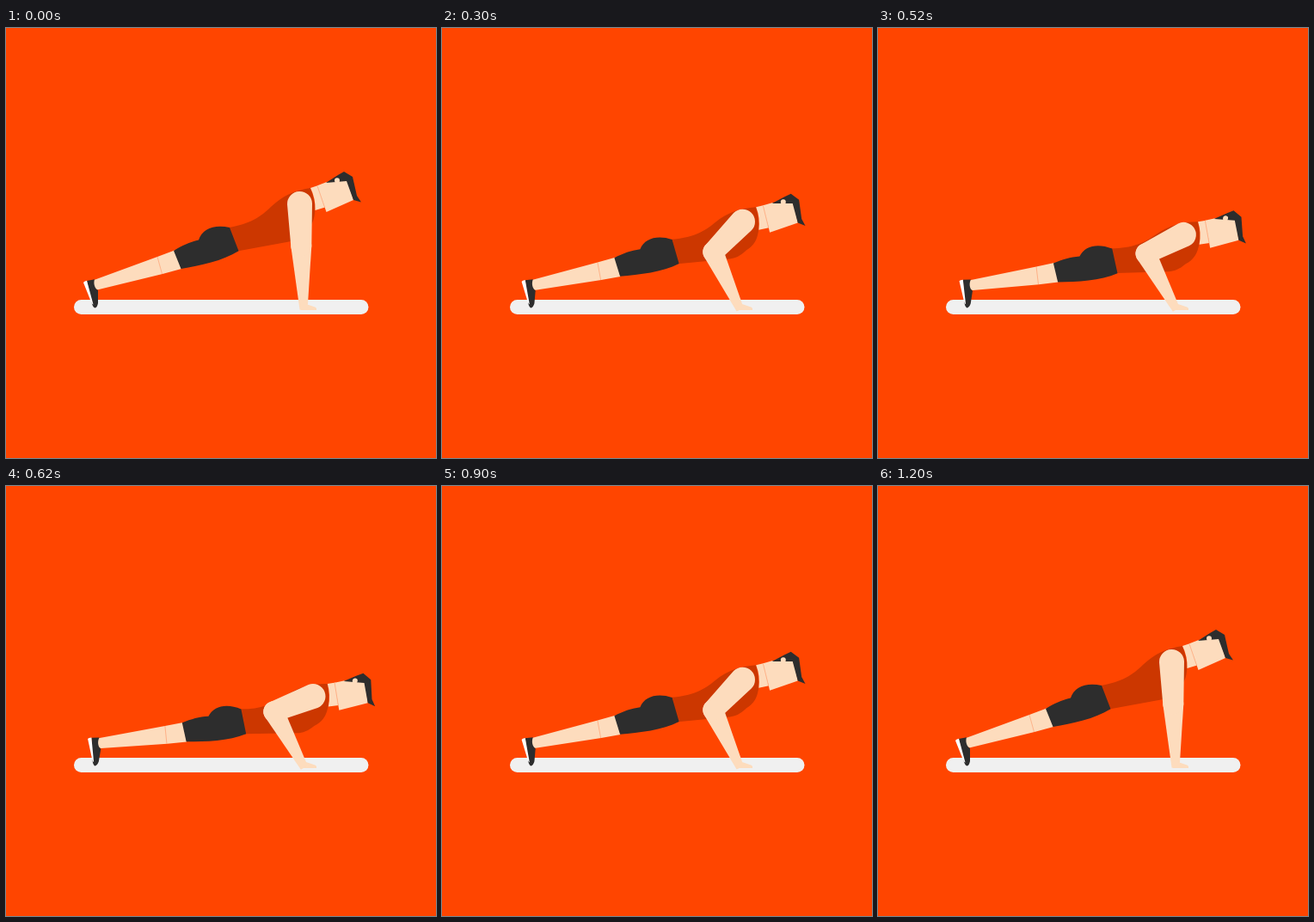
An HTML page for the animation above (1240 ms loop, 500 px wide and 500 px high).

```html
<!DOCTYPE html>
<html lang="en">
<head>
<meta charset="utf-8">
<title>Push-up</title>
<style>
  html, body { margin: 0; width: 100%; height: 100%; overflow: hidden; background: #ff4500; }
  svg { display: block; width: 100%; height: 100%; }
  .skin { fill: #fddcbd; }
  .dark { fill: #2d2d2d; }
  .shirt { fill: #cc3700; }
  .pale { fill: #f0f0f0; }
  .seam { fill: none; stroke: #ff4500; stroke-width: .6; opacity: .45; }
</style>
</head>
<body>
<svg viewBox="0 0 500 500">
  <rect class="pale" x="79" y="316" width="342.5" height="17" rx="8.5"/>

  <g id="body">
    <!-- leg and shoe -->
    <path class="skin" d="M196 258.5L176 266L101 293.5L102 303L107 304.3L182 286L204 280Z"/>
    <path class="seam" d="M176 266L181.5 286"/>
    <path class="dark" d="M94 294L103 292.3C101.500 297 103 303 107 305L107 320Q106 325 103.500 325.500Q101.500 325 100 321Z"/>
    <path d="M90 296Q90.500 294.500 94 293.800L101.500 321.500Q100 321.500 98 316Z" fill="#fff"/>

    <!-- torso and shorts -->
    <path class="shirt" d="M259 232C283 228 296 220 308 208C322 195 335 189 354 186C357 194 359.300 203 359.300 210C359.300 224 355 231 347 237C341 244 335 247.500 329 248.500L269 259.500Z"/>
    <path class="dark" d="M195 259C205 253 213 249 224 246.500C228 233 243 228 260 232L270.500 259.300C252 271 226 276 203.500 280Z"/>

    <!-- neck and head -->
    <path class="skin" d="M354 186L363 183L371 208.500L359.500 212Q360 198 354 186Z"/>
    <path class="skin" d="M362 183.300L373 179L397 177L404 200L372.500 214Z"/>
    <path class="seam" d="M362 183.500L370.500 208.500"/>
    <path class="dark" d="M372 180L386 171L393 167L403 173L408 195L413 202.500L404 200L396 178Z"/>
    <circle class="skin" cx="385" cy="177.300" r="3"/>
  </g>

  <path class="skin" d="M343 320L343 328H361Q361.500 325 358.500 324.300L350.500 321.500Z"/>
  <path class="skin" id="fore" d="M0 -12A12 12 0 0 0 0 12L74.200 4.500V-4.500Z"/>
  <path class="skin" id="upper" d="M0 -14.500A14.500 14.500 0 0 0 0 14.500L49 12A12 12 0 0 0 49 -12Z"/>
</svg>
<script>
  const LOOP = 1240, HALF = 600, STEP = 20;
  const UPPER = 49, FORE = 72.5, TILT = 10;
  const wrist = { x: 346, y: 326 };
  const [body, upper, fore] = ['body', 'upper', 'fore'].map(id => document.getElementById(id));

  const place = (limb, x, y, angle) =>
    limb.setAttribute('transform', `translate(${x} ${y}) rotate(${angle * 180 / Math.PI})`);

  function pose(p) {
    body.setAttribute('transform', `rotate(${TILT * p} 104 325)`);

    // two-bone arm between the moving shoulder and the planted wrist
    const sx = 341.5 + 16 * p, sy = 204.5 + 41.4 * p;
    const dx = wrist.x - sx, dy = wrist.y - sy, d = Math.hypot(dx, dy);
    const bend = (UPPER ** 2 + d ** 2 - FORE ** 2) / (2 * UPPER * d);
    const angle = Math.atan2(dy, dx) + Math.acos(Math.min(1, bend));
    const ex = sx + UPPER * Math.cos(angle), ey = sy + UPPER * Math.sin(angle);
    place(upper, sx, sy, angle);
    place(fore, ex, ey, Math.atan2(wrist.y - ey, wrist.x - ex));
  }

  function tick() {
    const t = Math.floor(performance.now() % LOOP / STEP) * STEP;
    pose(1 - Math.abs(Math.min(t, 2 * HALF) - HALF) / HALF);
    requestAnimationFrame(tick);
  }
  tick();
</script>
</body>
</html>
```
